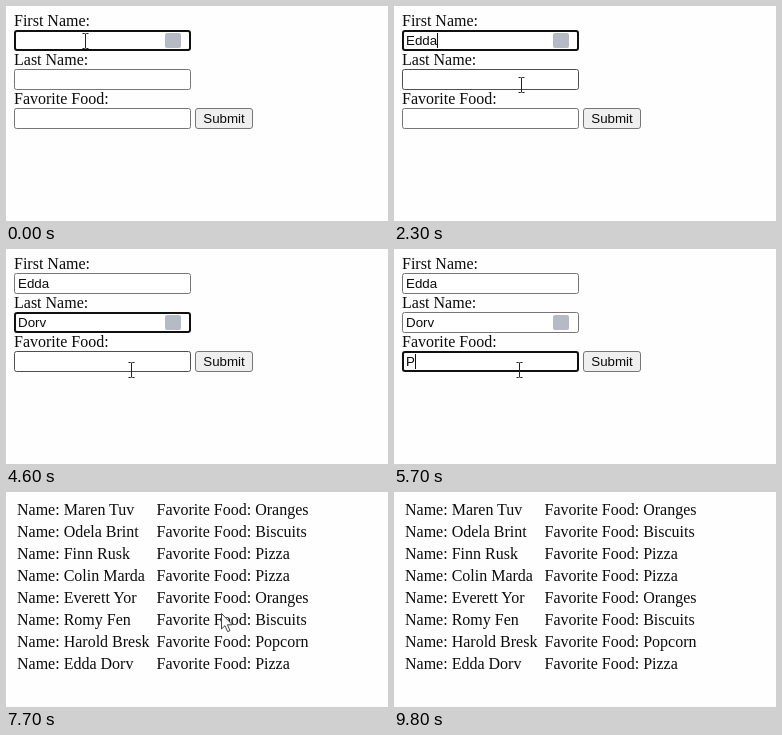
These frames come from a looping animation (382x215 px, 10 s). An HTML page:

```html
<!DOCTYPE html>
<html lang="en">
<head>
<meta charset="utf-8">
<title>Favorite food form</title>
<style>
  html, body { margin: 0; height: 100%; overflow: hidden; background: #fefefe; }
  svg { display: block; }
  text { font: 16px "Liberation Serif", "Times New Roman", serif; fill: #0c0c0c; }
  .ui { font: 13.333px "Liberation Sans", Arial, sans-serif; }
</style>
</head>
<body>
<svg id="stage" width="382" height="215" viewBox="0 0 382 215">
  <g id="form"></g>
  <g id="table"></g>
  <path id="beam" d="M-2.5-7.5H-.5Q.5-7.5 .5-6.5Q.5-7.5 1.5-7.5H3.5M.5-7V7M-2.5 7.5H-.5Q.5 7.5 .5 6.5Q.5 7.5 1.5 7.5H3.5" fill="none" stroke="#222"/>
  <path id="arrow" d="M.5.5V16L4 12.7L6.6 18.7L9 17.6L6.4 11.8H11.3Z" fill="#fff" stroke="#444"/>
</svg>
<script>
const LOOP = 10000, STEP = 100;
const SUBMITTED = 7600, POINTER_GONE = 9800;
const BORDER = "#767676", HOVER_BORDER = "#4f4f4f";
const $ = id => document.getElementById(id);

function add(parent, tag, attrs, content = "") {
  const el = document.createElementNS("http://www.w3.org/2000/svg", tag);
  set(el, attrs);
  el.textContent = content;
  return parent.appendChild(el);
}
function set(el, attrs) {
  for (const key in attrs) el.setAttribute(key, attrs[key]);
}
const show = (el, on) => { el.style.display = on ? "" : "none"; };

// Form: each field has its focus time and the time of each key press.
const fields = [
  { label: "First Name:", value: "Edda", focus: -500, keys: [800, 1000, 1200, 1300] },
  { label: "Last Name:", value: "Dorv", focus: 2500, keys: [3300, 3400, 3600, 3700] },
  { label: "Favorite Food:", value: "Pizza", focus: 4700, keys: [5700, 5900, 6200, 6400, 6600] }
];
const form = $("form");
fields.forEach((field, i) => {
  field.top = 24 + 39 * i;
  add(form, "text", { x: 8, y: field.top - 4 }, field.label);
  field.box = add(form, "rect", { rx: 2, fill: "#fff" });
  field.text = add(form, "text", { x: 12, y: field.top + 15, class: "ui" });
});
const badge = add(form, "rect", { x: 159, width: 16, height: 15, rx: 2, fill: "#b5bac5" });
const caret = add(form, "rect", { width: 1, height: 15, fill: "#111" });
const button = add(form, "rect", { x: 189.5, y: 102.5, width: 57, height: 20, rx: 2.5 });
add(form, "text", { x: 218, y: 117, class: "ui", "text-anchor": "middle" }, "Submit");

// Table shown after submitting
[
  ["Maren Tuv", "Oranges"], ["Odela Brint", "Biscuits"], ["Finn Rusk", "Pizza"],
  ["Colin Marda", "Pizza"], ["Everett Yor", "Oranges"], ["Romy Fen", "Biscuits"],
  ["Harold Bresk", "Popcorn"], ["Edda Dorv", "Pizza"]
].forEach(([name, food], i) => {
  const y = 23 + 22 * i;
  add($("table"), "text", { x: 11, y }, "Name: " + name);
  add($("table"), "text", { x: 150.5, y }, "Favorite Food: " + food);
});

// Pointer path: time, x, y
const path = [
  [0, 79, 35], [1700, 79, 35], [2400, 130, 82], [4200, 130, 82], [4500, 125, 121],
  [7100, 125, 121], [7500, 215, 121], [8100, 215, 121], [8800, 312, 70],
  [9300, 290, 60], [9700, 240, 170], [LOOP, 240, 170]
];
function pointerAt(t) {
  const i = path.findIndex(p => p[0] > t);
  const [t0, x0, y0] = path[i - 1], [t1, x1, y1] = path[i];
  const u = (t - t0) / (t1 - t0), k = u * u * (3 - 2 * u);
  return [Math.round(x0 + (x1 - x0) * k), Math.round(y0 + (y1 - y0) * k)];
}

function drawForm(t, hovered, overButton) {
  const active = fields.findLast(f => f.focus <= t);
  for (const field of fields) {
    const on = field === active, inset = on ? 1 : 0.5;
    set(field.box, {
      x: 8 + inset, y: field.top + inset, width: 177 - 2 * inset, height: 21 - 2 * inset,
      stroke: on ? "#101010" : field === hovered ? HOVER_BORDER : BORDER,
      "stroke-width": 2 * inset
    });
    field.text.textContent = field.value.slice(0, field.keys.filter(k => k <= t).length);
  }
  set(badge, { y: (t < fields[1].focus ? fields[0] : fields[1]).top + 3 });
  set(button, {
    fill: overButton ? "#e5e5e5" : "#efefef",
    stroke: overButton ? HOVER_BORDER : BORDER
  });

  // The caret blink restarts on every key press.
  const last = Math.max(active.focus, ...active.keys.filter(k => k <= t));
  const typed = active.text.textContent ? active.text.getComputedTextLength() : 0;
  set(caret, { x: Math.round(12 + typed), y: active.top + 3 });
  show(caret, (t - last) % 1000 < 500);
}

function draw(now) {
  const t = Math.floor(now % LOOP / STEP) * STEP;
  const filling = t < SUBMITTED;
  const [x, y] = pointerAt(t);
  const inRow = f => y >= f.top && y < f.top + 21;
  const hovered = filling && x < 185 && fields.find(inRow);
  const overButton = x >= 189 && x < 247 && inRow(fields[2]);

  show(form, filling);
  show($("table"), !filling);
  if (filling) drawForm(t, hovered, overButton);

  show($("beam"), hovered);
  show($("arrow"), !hovered && t < POINTER_GONE);
  const move = { transform: `translate(${x} ${y})` };
  set($("beam"), move);
  set($("arrow"), move);
}

let start;
function tick(now) {
  start ??= now;
  draw(now - start);
  requestAnimationFrame(tick);
}
draw(0);
requestAnimationFrame(tick);
</script>
</body>
</html>
```
